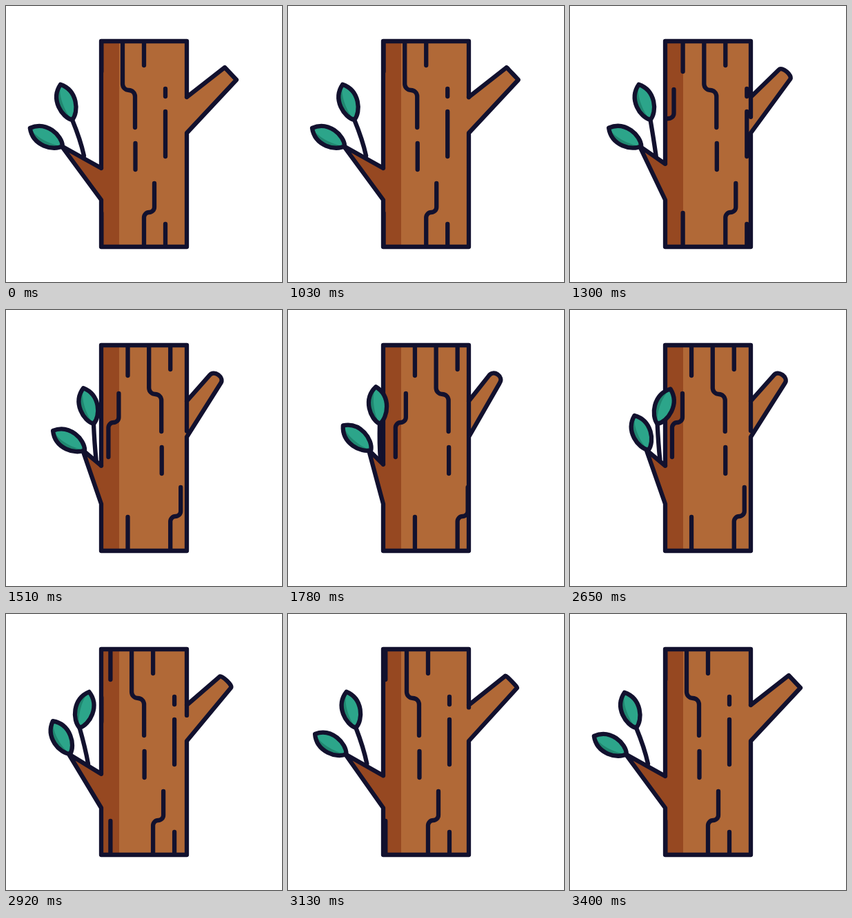
These frames come from a looping animation (400x400 px, 3430 ms). An HTML page with a canvas:

```html
<!DOCTYPE html>
<html lang="en">
<head>
<meta charset="utf-8">
<title>Turning log</title>
<style>
html, body { margin: 0; width: 100%; height: 100%; overflow: hidden; background: #fff; }
canvas { display: block; width: 100vmin; height: 100vmin; }
</style>
</head>
<body>
<canvas id="stage"></canvas>
<script>
const LOOP = 3430, FIRST_STEP = 1030, STEP = 30;
const INK = '#12112e', BARK = '#b16937', SHADE = '#964821';
const LEAF = '#2ca58a', LEAF_SHADE = '#208770';
const LEFT = 138, RIGHT = 262, TOP = 51, BOTTOM = 349;
const MAX_SHIFT = 48.7, MAX_SWING = 39;

const canvas = document.getElementById('stage');
const ctx = canvas.getContext('2d');
const ratio = window.devicePixelRatio || 1;
canvas.width = canvas.height = 400 * ratio;

// Cubic easing with handles (a, 0) and (b, 1), solved by bisection.
function ease(time, start, end, a, b) {
  const x = Math.min(1, Math.max(0, (time - start) / (end - start)));
  if (x === 0 || x === 1) return x;
  let low = 0, high = 1, s = 0.5;
  for (let i = 0; i < 30; i++) {
    s = (low + high) / 2;
    const r = 1 - s;
    if (3 * a * s * r * r + 3 * b * s * s * r + s * s * s < x) low = s;
    else high = s;
  }
  return s * s * (3 - 2 * s);
}

const barkLines = new Path2D([
  'M169 51V113a9 9 0 0 0 9 9a9 9 0 0 1 9 9V176',
  'M200 51V86',
  'M231 120V131',
  'M231 153V218',
  'M187.5 199V237',
  'M215 257V291.5a7.5 7.5 0 0 1 -7.5 7.5a7.5 7.5 0 0 0 -7.5 7.5V349',
  'M231 316V349',
  'M138.3 51V95',
  'M138.3 300V349',
  'M125.2 121V155.5a7.5 7.5 0 0 1 -7.5 7.5a7.5 7.5 0 0 0 -7.5 7.5V213'
].join(''));
const leafShape = new Path2D('M0 0C-13 -8 -21 -38 0 -54C21 -38 13 -8 0 0Z');
const leafDark = new Path2D('M0 0C-13 -8 -21 -38 0 -54C-9 -38 -6 -12 0 0Z');

function drawLeaf(x, y, degrees) {
  ctx.save();
  ctx.translate(x, y);
  ctx.rotate(degrees * Math.PI / 180);
  ctx.fillStyle = LEAF;
  ctx.fill(leafShape);
  ctx.fillStyle = LEAF_SHADE;
  ctx.fill(leafDark);
  ctx.stroke(leafShape);
  ctx.restore();
}

function rightBranch(shift) {
  const x1 = 317 - 0.57 * shift, y1 = 89 + 0.14 * shift;
  const x2 = 334 - 0.6 * shift, y2 = 107 - 0.02 * shift;
  const bulge = 0.667 * shift / MAX_SHIFT;
  const bx = (y2 - y1) * bulge, by = (x1 - x2) * bulge;
  ctx.lineTo(RIGHT, 132);
  ctx.lineTo(x1, y1);
  ctx.bezierCurveTo(x1 + bx, y1 + by, x2 + bx, y2 + by, x2, y2);
  ctx.lineTo(RIGHT, 184);
}

function drawTrunk(shift) {
  const tipX = 80.5 + 0.8 * shift, tipY = 203;
  const leftY = 235 - 0.245 * shift;

  ctx.fillStyle = BARK;
  ctx.fillRect(LEFT, TOP, RIGHT - LEFT, BOTTOM - TOP);
  ctx.beginPath();
  rightBranch(shift);
  ctx.lineTo(RIGHT - 2, 184);
  ctx.lineTo(RIGHT - 2, 132);
  ctx.fill();

  ctx.fillStyle = SHADE;
  ctx.fillRect(LEFT, TOP, 26, BOTTOM - TOP);
  ctx.beginPath();
  ctx.moveTo(LEFT + 2, leftY);
  ctx.lineTo(LEFT, leftY);
  ctx.lineTo(tipX, tipY);
  ctx.lineTo(LEFT, 281);
  ctx.lineTo(LEFT + 2, 281);
  ctx.fill();

  ctx.save();
  ctx.beginPath();
  ctx.rect(LEFT, TOP, RIGHT - LEFT, BOTTOM - TOP);
  ctx.clip();
  ctx.translate(shift, 0);
  ctx.stroke(barkLines);
  ctx.restore();

  // The right edge grows down across the branch as it turns away.
  ctx.beginPath();
  ctx.moveTo(LEFT, leftY);
  ctx.lineTo(LEFT, TOP);
  ctx.lineTo(RIGHT, TOP);
  ctx.lineTo(RIGHT, Math.min(184, 132 + 1.14 * shift));
  ctx.moveTo(RIGHT, 132);
  rightBranch(shift);
  ctx.lineTo(RIGHT, BOTTOM);
  ctx.lineTo(LEFT, BOTTOM);
  ctx.lineTo(LEFT, 281);
  ctx.lineTo(tipX, tipY);
  ctx.lineTo(LEFT, leftY);
  ctx.stroke();
}

function drawTwig(shift, swing) {
  const x = 96 + 0.81 * shift;
  ctx.beginPath();
  ctx.moveTo(x, 165);
  ctx.quadraticCurveTo(108 + 0.53 * shift, 194, 113 + 0.46 * shift, 217);
  ctx.stroke();
  drawLeaf(x, 165, swing - 18.4);
  drawLeaf(82 + 0.84 * shift, 203, swing - 61);
}

function draw(time) {
  const shift = MAX_SHIFT * (ease(time, 1000, 2200, 0.22, 0.09) - ease(time, 2200, 3400, 0.61, 0.39));
  const swing = MAX_SWING * (ease(time, 1200, 2400, 0.69, 0.48) - ease(time, 2650, 3400, 0.8, 0.1));
  ctx.setTransform(ratio, 0, 0, ratio, 0, 0);
  ctx.fillStyle = '#fff';
  ctx.fillRect(0, 0, 400, 400);
  ctx.strokeStyle = INK;
  ctx.lineWidth = 6.3;
  ctx.lineCap = ctx.lineJoin = 'round';
  drawTrunk(shift);
  drawTwig(shift, swing);
}

const origin = performance.now();
function tick() {
  const time = (performance.now() - origin) % LOOP;
  const steps = Math.floor((time - FIRST_STEP) / STEP);
  draw(steps < 0 ? 0 : FIRST_STEP + steps * STEP);
  requestAnimationFrame(tick);
}
tick();
</script>
</body>
</html>
```
